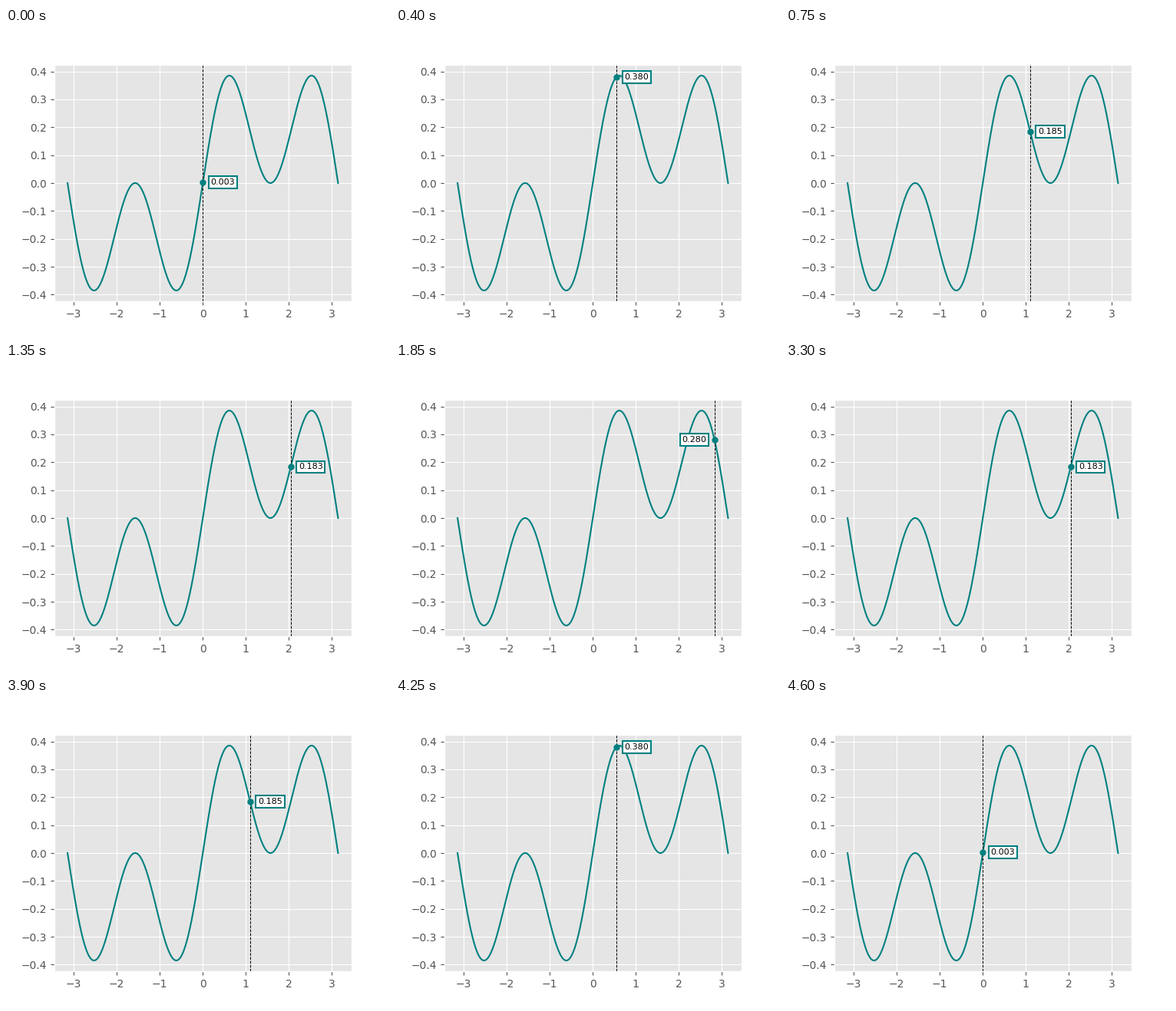
Recreate the animation shown at these times as a matplotlib script. Size 500 px wide and 400 px high, loop 5150 ms.

```python
import matplotlib.pyplot as plt
import numpy as np
from matplotlib.animation import FuncAnimation

plt.style.use("ggplot")

COLOR = "teal"
STEPS = 40          # moves from the middle to the right end
FRAMES = 103
GAP = 10.2          # pixels between the point and its label
FLIP_X = 2.55       # beyond this the label sits on the left

x = np.linspace(-np.pi, np.pi, 1000)
y = np.sin(x) * np.cos(x) ** 2

fig, ax = plt.subplots(figsize=(5, 4), dpi=100)
ax.plot(x, y, color=COLOR, lw=1.5)
cursor = ax.axvline(0, color="black", ls="--", lw=0.7)
dot, = ax.plot([0], [0], "o", color=COLOR, ms=5, mew=1, zorder=3)
label = ax.annotate(
    "", xy=(0, 0), xytext=(GAP, 0), textcoords="offset pixels",
    fontsize=8, color="black", va="center", zorder=4,
    bbox=dict(facecolor="white", edgecolor=COLOR, lw=1.5, pad=2),
)


def step_at(frame):
    """Sweep right, rest at the end, sweep back, rest in the middle."""
    return int(np.clip(min(frame - 1, 92 - frame), 0, STEPS))


def update(frame):
    i = int((len(x) - 1) * (0.5 + step_at(frame) / (2 * STEPS)) + 0.5)
    px, py = x[i], y[i]
    flipped = px > FLIP_X

    cursor.set_xdata([px, px])
    dot.set_data([px], [py])
    label.xy = (px, py)
    label.set_position((-GAP if flipped else GAP, 0))
    label.set_ha("right" if flipped else "left")
    label.set_text(f"{py:.3f}")
    return cursor, dot, label


anim = FuncAnimation(fig, update, frames=FRAMES, interval=50,
                     repeat=True, repeat_delay=0)
plt.show()
```
